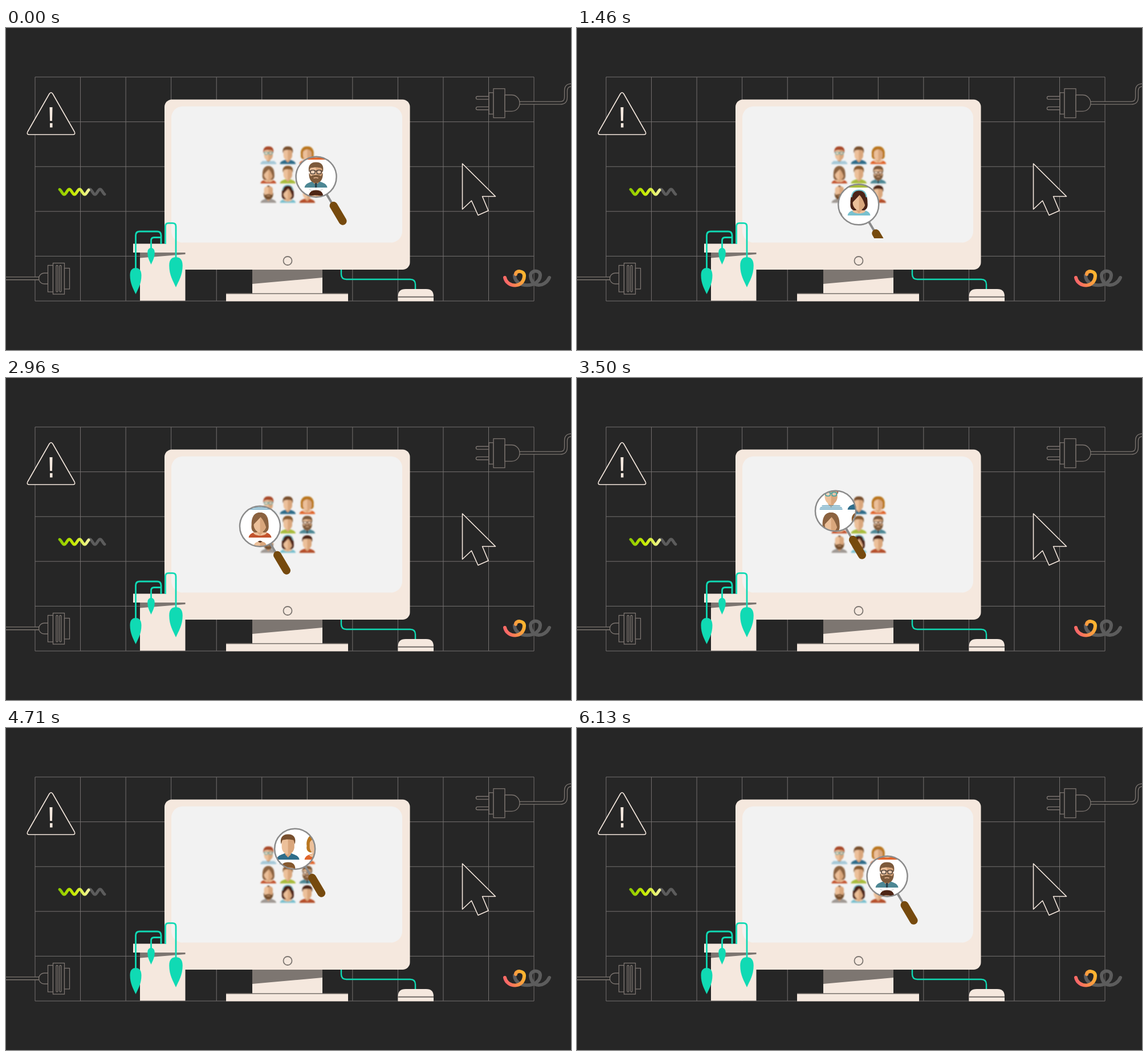
An HTML page that plays this animation: 991x565 px, repeating every 6.21 s.

```html
<!DOCTYPE html>
<html lang="en">
<head>
<meta charset="utf-8">
<title>Searching through people</title>
<style>
  html, body { margin: 0; width: 100%; height: 100%; overflow: hidden; background: #262626; }
  svg { display: block; }
  .thin { fill: #262626; stroke: #7d7671; stroke-width: 1.3; }
  .cable { fill: none; stroke: #7d7671; stroke-width: 6.2; }
  .core { fill: none; stroke: #262626; stroke-width: 3.6; }
  .outline { fill: #262626; stroke: #f5e8de; stroke-width: 1.6; stroke-linejoin: round; }
  .cream { fill: #f5e8de; }
  .shade { fill: #7d7671; }
  .stem { fill: none; stroke: #10dab4; stroke-width: 2.8; }
  .squiggle { fill: none; stroke: #5c5c5c; stroke-width: 5; stroke-linecap: round; stroke-linejoin: round; }
</style>
</head>
<body>
<svg id="stage" width="991" height="565" viewBox="0 0 991 565">
  <defs>
    <linearGradient id="lime" gradientUnits="userSpaceOnUse" x1="92" x2="146" y1="0" y2="0">
      <stop stop-color="#86c400"/><stop offset=".5" stop-color="#c6ea00"/><stop offset="1" stop-color="#f5f5a4"/>
    </linearGradient>
    <linearGradient id="warm" gradientUnits="userSpaceOnUse" x1="876" y1="445" x2="906" y2="428">
      <stop stop-color="#f8646a"/><stop offset=".5" stop-color="#fb9148"/><stop offset="1" stop-color="#fdb52f"/>
    </linearGradient>
    <path id="leaf" d="M-.5,.28C-.5,.06-.25,0 0,0S.5,.06 .5,.28C.5,.6 .2,.8 0,1C-.2,.8-.5,.6-.5,.28Z" fill="#10dab4"/>
    <clipPath id="lensClip"><circle id="hole" r="35.5"/></clipPath>
    <clipPath id="screenClip"><rect x="290" y="137" width="405" height="232"/></clipPath>
    <filter id="soft" x="-20%" y="-20%" width="140%" height="140%"><feGaussianBlur stdDeviation="1.5"/></filter>
    <g id="people"></g>
  </defs>

  <path id="grid" fill="none" stroke="#757170" stroke-width="1"/>

  <path class="outline" d="M76,115.500Q79,111 82,115.500L120,182Q122.500,187 117,187H41Q35.500,187 38,182Z"/>
  <path class="cream" d="M76.500,139h5l-.6,24h-3.800ZM77,167h4.500v7.500h-4.500Z"/>
  <path class="outline" d="M800.500,238L858.500,295.500H835.500L846,320.500L828,328.500L816.500,303L800.500,318Z"/>

  <path class="cable" d="M901,131.500H972Q982,131.500 982,121.500V110Q982,100 993,100"/>
  <path class="core" d="M901,131.500H972Q982,131.500 982,121.500V110Q982,100 993,100"/>
  <g class="thin">
    <path d="M847,120H827a2.500 2.500 0 0 0 0,5.200H847ZM847,138.300H827a2.500 2.500 0 0 0 0,5.200H847Z"/>
    <rect x="847" y="113.500" width="8" height="37.500"/>
    <rect x="855" y="106.500" width="20" height="51"/>
    <path d="M875,117.500H887a14 14.300 0 0 1 0,28.600H875Z"/>
  </g>

  <path class="cable" d="M-2,439.300H58"/>
  <path class="core" d="M-2,439.300H58"/>
  <g class="thin">
    <path d="M74,430H67a9.500 9.500 0 0 0 0,19H74Z"/>
    <rect x="73.500" y="416.500" width="9" height="46.500"/>
    <rect x="82.500" y="412.500" width="20" height="54.500"/>
    <rect x="102.500" y="421.500" width="9" height="36.500"/>
    <rect x="88" y="416.500" width="3" height="46.500" rx="1.500"/>
    <rect x="94" y="416.500" width="3" height="46.500" rx="1.500"/>
  </g>

  <path class="squiggle" id="waveTail"/>
  <path class="squiggle" id="wave" style="stroke:url(#lime)"/>
  <g style="stroke-width:6">
    <path class="squiggle" style="stroke-width:6" d="M892,434C892,457 936,457 937,434C937,424 921,424 920,434C921,456 945,456 953,438"/>
    <path class="squiggle" style="stroke-width:6;stroke:url(#warm)" d="M875,438C879,456 908,457 909,435C909,425 894,425 894,432"/>
  </g>

  <rect class="cream" x="432" y="424" width="123" height="43"/>
  <path class="shade" d="M432,424H555V438L432,449Z"/>
  <rect class="cream" x="386" y="466" width="214" height="13.500"/>
  <rect class="shade" x="386" y="465.300" width="214" height="1.600"/>
  <path class="stem" style="stroke-width:2.400" d="M588,424V432Q588,441 597,441H709Q718,441 718,450V459"/>
  <path class="cream" d="M687.500,479.500V471Q687.500,458 701,458H737Q750,458 750,471V479.500Z"/>
  <rect class="shade" x="687.500" y="470.800" width="62.500" height="2.200"/>

  <rect class="cream" x="278" y="125.500" width="430.500" height="298.500" rx="13"/>
  <rect x="290" y="137.500" width="405" height="239" rx="20" fill="#f2f2f2"/>
  <circle cx="494" cy="408.500" r="7.500" fill="none" stroke="#7d7671" stroke-width="1.800"/>

  <path class="cream" d="M223,378.500H315V394H223ZM235,394H314.500V478.500H235Z"/>
  <path class="shade" d="M235,394H314.500V397L235,403.500Z"/>
  <path class="stem" d="M227.500,425V364Q227.500,357 234.500,357H265Q272,357 272,364V379M254.500,390V373Q254.500,367.500 260,367.500H272M279.500,379V348Q279.500,342.300 285,342.300H292Q298,342.300 298,348V406"/>
  <use href="#leaf" transform="translate(227.500 421)scale(20 46)"/>
  <use href="#leaf" transform="translate(254.500 386)scale(12.500 29)"/>
  <use href="#leaf" transform="translate(298 402)scale(23.500 53)"/>

  <use href="#people" filter="url(#soft)" transform="translate(494.300 257.500)scale(.695)"/>
  <g clip-path="url(#screenClip)">
    <g clip-path="url(#lensClip)">
      <rect x="290" y="137" width="405" height="239" fill="#fff"/>
      <use href="#people" transform="translate(494.600 258)"/>
    </g>
    <g id="lens" fill="none" stroke="#8b8b8b">
      <circle r="35.500" stroke-width="2.500"/>
      <path d="M18.500,31L28,47" stroke-width="4"/>
      <path d="M30.500,50.500L46.500,77.500" stroke="#764a0e" stroke-width="14" stroke-linecap="round"/>
    </g>
  </g>
</svg>
<script>
const el = id => document.getElementById(id);
const shape = (d, fill) => `<path d="${d}" fill="${fill}"/>`;
const line = (d, stroke, w = 1) => `<path d="${d}" fill="none" stroke="${stroke}" stroke-width="${w}"/>`;

// Background grid
let d = "";
for (let i = 0; i < 12; i++) d += `M${51 + i * 79.55},86V479`;
for (let i = 0; i < 6; i++) d += `M51,${86 + i * 78.6}H926`;
el("grid").setAttribute("d", d);

// Small wave: bright first part, grey tail
function wave(from, to) {
  const pts = [];
  for (let x = from; x <= to; x++) pts.push(`${x},${287.5 - 4.5 * Math.cos((x - 93) * Math.PI / 9)}`);
  return "M" + pts.join("L");
}
el("wave").setAttribute("d", wave(94, 145));
el("waveTail").setAttribute("d", wave(145, 173));

// People, each about 40 x 45 units around its centre
const skin = "#ecc09a", tan = "#d9a67c";
const shoulders = "M-20,22C-19,15-12,13.500-6,11H6C12,13.500 19,15 20,22Z";
const head = "M-11,-12C-11,-23 11,-23 11,-12V0C11,7 5,13 0,13S-11,7-11,0Z";
const headShade = "M0,-20C7,-20 11,-18 11,-12V0C11,7 5,13 0,13Z";
const neck = "M-5,6H5V13L0,18L-5,13Z";
const cap = "M-12,-5C-15,-16-9,-23 0,-22.500C10,-23 15,-16 12,-5L10,-12C5,-14-5,-14-10,-12Z";
const beard = "M-12,-4L-9,2C-5,-1 5,-1 9,2L12,-4C13,7 8,14 0,14S-13,7-12,-4Z";
const scoop = "M-12,14L-4,10H4L12,14C8,20-8,20-12,14Z";

const face = (shirt, hair) => shape(shoulders, shirt) + shape(neck, tan) +
  shape(head, skin) + shape(headShade, tan) + (hair ? shape(cap, hair) : "");
const longHair = (shirt, hair, back, fringe) => shape(shoulders, shirt) + shape(scoop, skin) +
  shape(back, hair) + shape(neck, tan) + shape(head, skin) + shape(headShade, tan) + shape(fringe, hair);
const glasses = c => `<g fill="#ffffff55" stroke="${c}" stroke-width="1.500"><rect x="-9.500" y="-8.500" width="8" height="6.500" rx="2.500"/><rect x="1.500" y="-8.500" width="8" height="6.500" rx="2.500"/><path d="M-12,-7H-9.500M-1.500,-7H1.500M9.500,-7H12"/></g>`;

const curls = "M0,-22.500C13,-24 18,-11 16,-2C18,6 12,11 6,9H-6C-12,11-18,6-16,-2C-18,-11-13,-24 0,-22.500Z";
const bob = "M0,-22C13,-22 15,-10 15,0C16,9 12,13 7,13H-7C-13,13-16,8-15,0C-15,-10-13,-22 0,-22Z";
const lowFringe = "M-12,0C-14,-16-8,-22 0,-22C10,-22 15,-12 12,8C10,2 7,-8 1,-14C-3,-9-8,-5-12,0Z";
const topFringe = "M-12,-5C-13,-17-7,-22 0,-22S13,-17 12,-5C10,-12 6,-14 0,-15C-6,-14-10,-12-12,-5Z";

const crew = [
  face("#e9f3f6", "#a8492b") + line("M-16,15.500H16M-19,18.300H19M-20,21H20", "#5b9cb9", 1.3) + glasses("#3aa3a5"),
  face("#2f6d8a", "#78502f"),
  longHair("#e0652c", "#b9761f", curls, topFringe),
  longHair("#c2532d", "#8b6240", bob, lowFringe),
  face("#a9bc3c", "#85592f"),
  face("#4d8794", "#7d5a3b") + shape(beard, "#7d5a3b") + line("M-4,5.500Q0,3.500 4,5.500", "#e7b795", 1.6) +
    glasses("#4d4038") + shape("M-2,14H2L1.500,22H-1.500Z", "#28404c"),
  face("#a09a94") + shape(beard, "#75502f") + line("M-4,5Q0,3 4,5", "#d9a67c", 1.5) + shape("M-4,-20Q0,-23 4,-20L0,-18Z", "#59331d"),
  longHair("#79c1cf", "#4b2418", bob, lowFringe) + line("M-13,-10C-12,-21-5,-22.500 0,-22.500S12,-21 13,-10", "#74c3cf", 2),
  face("#bb532d", "#4e2515") + line("M-17,18H-7M7,18H17M-19,20.500H19", "#7c3018", 1.2).replace("/>", ' stroke-dasharray="1.200 2"/>') +
    line("M-12,-24L-6,-21M12,-24L6,-21", "#b5b0ac", .8)
];
el("people").innerHTML = crew.map((p, i) =>
  `<g transform="translate(${(i % 3 - 1) * 49} ${(Math.floor(i / 3) - 1) * 49})">${p}</g>`).join("");

// Lens orbit: [time in ms, angle in degrees]
const loop = 6210;
const orbit = [[0, 1], [710, 46.3], [2170, 133.5], [2960, 180], [4000, 243.5],
  [5170, 310], [5500, 325.5], [5830, 343], [6130, 360], [loop, 361]];

function draw(now) {
  const t = now % loop;
  const k = orbit.findIndex(([time]) => time > t);
  const [t0, a0] = orbit[k - 1], [t1, a1] = orbit[k];
  const angle = (a0 + (a1 - a0) * (t - t0) / (t1 - t0)) * Math.PI / 180;
  const place = `translate(${494.8 + 49.3 * Math.cos(angle)} ${260.3 + 49.5 * Math.sin(angle)})`;
  el("lens").setAttribute("transform", place);
  el("hole").setAttribute("transform", place);
  requestAnimationFrame(draw);
}
draw(0);
</script>
</body>
</html>
```
